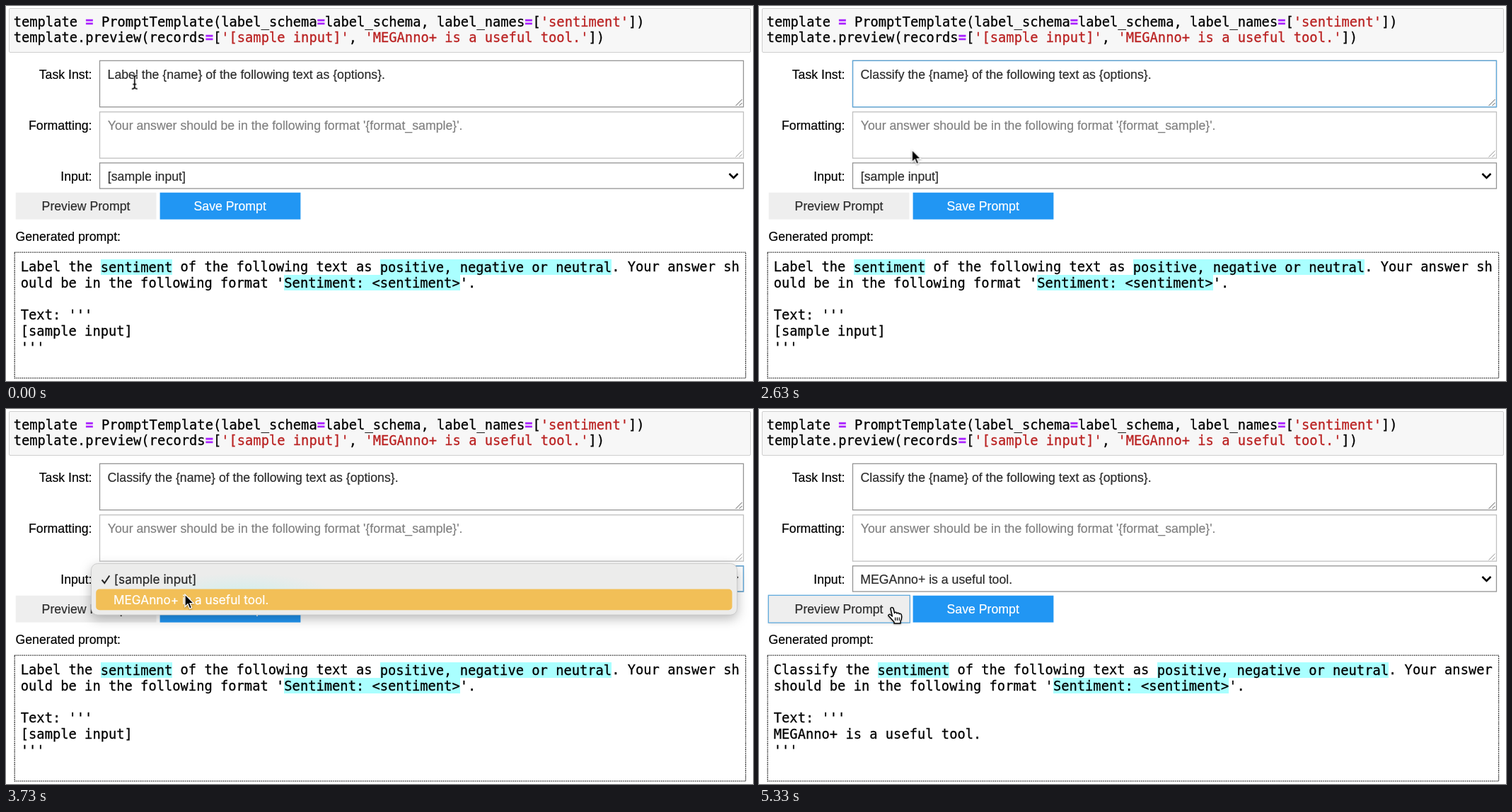
An HTML page that plays this animation: 1056 by 530 pixels, repeating every 5.6 s.

```html
<!DOCTYPE html>
<html lang="en">
<head>
<meta charset="utf-8">
<title>Prompt preview</title>
<style>
html, body { margin: 0; width: 100%; height: 100%; overflow: hidden; background: #fff; }
body { position: relative; }
pre {
  position: absolute; margin: 0; box-sizing: border-box; color: #000;
  font: 18.76px/22.77px "DejaVu Sans Mono", monospace;
  -webkit-text-stroke: .3px;
}
#cell {
  left: 4px; top: 3px; width: 1049px; height: 63px; padding: 7.6px 0 0 5.7px;
  background: #f7f7f7; border: 1px solid #cfcfcf; border-radius: 2px;
}
#cell b { color: #a2f; }
#cell i { color: #ba2121; font-style: normal; }
.out { left: 20.8px; top: 358px; }
.out span { background: #aff; padding: .5px 0; }
svg { position: absolute; left: 0; top: 0; }
text {
  font: 17.7px "Liberation Sans", Arial, sans-serif; white-space: pre;
  color: #2c2c2c; fill: currentColor; stroke: currentColor; stroke-width: .2;
}
.label { color: #000; text-anchor: end; }
.mid { text-anchor: middle; }
.menu text { font: 17.2px Inter, sans-serif; color: #262626; }
.menu .on text { color: #fff; }
.field { fill: #fff; stroke: #949494; stroke-width: 1.3; }
.ring { fill: none; stroke: #5fa9dd; stroke-width: 1.3; }
.grip { stroke: #555; stroke-width: 1; fill: none; }
.shade { filter: drop-shadow(0 2px 2px rgba(0,0,0,.35)); }
.on rect { fill: #f2bf57; }

/* Everything below runs on one 5.6 s loop */
.a { opacity: 0; animation: 5.6s step-end infinite; }
.k-task { animation-name: task; }
.k-caret { animation-name: caret; }
.k-sel { animation-name: sel, drag; animation-timing-function: step-end, linear; }
.k-select { animation-name: select; }
.k-before { animation-name: before; }
.k-after { animation-name: after; }
.k-menu { animation-name: menu; animation-timing-function: linear; }
.k-one { animation-name: one; }
.k-two { animation-name: two; }
.k-save { animation-name: save; }
.k-hover { animation-name: hover; }
.k-press { animation-name: press; }
.k-focus { animation-name: focus; }
.k-old { animation-name: old; }
.k-new { animation-name: fresh; }
.k-beam { animation-name: beam; }
.k-arrow { animation-name: arrow; }
.k-hand { animation-name: hand; }
#mouse { animation: move 5.6s linear infinite; }

@keyframes task { 0% { opacity: 0 } 9.64% { opacity: 1 } 51.79%, 100% { opacity: 0 } }
@keyframes caret { 0% { opacity: 0 } 9.64% { opacity: 1 } 10.71% { opacity: 0 } 17.86% { opacity: 1 } 45.9%, 100% { opacity: 0 } }
@keyframes sel { 0% { opacity: 0 } 10.71% { opacity: 1 } 17.86%, 100% { opacity: 0 } }
@keyframes drag {
  0%, 10.71% { x: 186.9px; width: 0 }
  14.82%, 100% { x: 143.6px; width: 43.3px }
}
@keyframes select { 0% { opacity: 0 } 51.79% { opacity: 1 } 84.64%, 100% { opacity: 0 } }
@keyframes before { 0% { opacity: 1 } 71.43%, 100% { opacity: 0 } }
@keyframes after { 0% { opacity: 0 } 71.43%, 100% { opacity: 1 } }
@keyframes menu { 0%, 52.31% { opacity: 0 } 52.32%, 71.43% { opacity: 1 } 74.1%, 100% { opacity: 0 } }
@keyframes one { 0% { opacity: 0 } 61.25% { opacity: 1 } 64.2%, 100% { opacity: 0 } }
@keyframes two { 0% { opacity: 0 } 64.2% { opacity: 1 } 69.64% { opacity: 0 } 70.71%, 100% { opacity: 1 } }
@keyframes save { 0% { opacity: 0 } 75% { opacity: 1 } 77.86%, 100% { opacity: 0 } }
@keyframes hover { 0% { opacity: 0 } 78.04% { opacity: 1 } 84.64%, 100% { opacity: .35 } }
@keyframes press { 0% { opacity: 0 } 84.64% { opacity: 1 } 86.6%, 100% { opacity: 0 } }
@keyframes focus { 0% { opacity: 0 } 84.64%, 100% { opacity: 1 } }
@keyframes old { 0% { opacity: 1 } 87.5%, 100% { opacity: 0 } }
@keyframes fresh { 0% { opacity: 0 } 87.5%, 100% { opacity: 1 } }
@keyframes beam { 0% { opacity: 1 } 17.86% { opacity: 0 } 41.61% { opacity: 1 } 44.5%, 100% { opacity: 0 } }
@keyframes arrow { 0% { opacity: 0 } 44.5% { opacity: 1 } 75%, 100% { opacity: 0 } }
@keyframes hand { 0% { opacity: 0 } 75%, 100% { opacity: 1 } }
@keyframes move {
  0%, .54% { transform: translate(181.8px, 107.6px); animation-timing-function: ease-in-out }
  9.64%, 10.71% { transform: translate(187px, 99px) }
  14.82%, 41.61% { transform: translate(145px, 99px); animation-timing-function: ease-in }
  46.96% { transform: translate(216px, 203px); animation-timing-function: ease-out }
  51.25%, 60.71% { transform: translate(248px, 234px); animation-timing-function: ease-in-out }
  66.61%, 72.3% { transform: translate(253px, 262px); animation-timing-function: ease-in }
  77.32% { transform: translate(220.5px, 272.5px); animation-timing-function: ease-out }
  79.1%, 79.8% { transform: translate(190px, 280px) }
  79.82%, 83.93% { transform: translate(189px, 280px) }
  85%, 95.17% { transform: translate(188.5px, 280.5px) }
  95.18%, 100% { transform: translate(188px, 281px) }
}
</style>
</head>
<body>
<pre id="cell">template <b>=</b> PromptTemplate(label_schema<b>=</b>label_schema, label_names<b>=</b>[<i>'sentiment'</i>])
template.preview(records<b>=</b>[<i>'[sample input]'</i>, <i>'MEGAnno+ is a useful tool.'</i>])</pre>

<pre class="out a k-old">Label the <span>sentiment</span> of the following text as <span>positive, negative or neutral</span>. Your answer sh
ould be in the following format '<span>Sentiment: &lt;sentiment&gt;</span>'.

Text: '''
[sample input]
'''</pre>

<pre class="out a k-new">Classify the <span>sentiment</span> of the following text as <span>positive, negative or neutral</span>. Your answer
should be in the following format '<span>Sentiment: &lt;sentiment&gt;</span>'.

Text: '''
MEGAnno+ is a useful tool.
'''</pre>

<svg width="1056" height="530" viewBox="0 0 1056 530">
  <defs>
    <path id="grip" d="M0 9L9 0M5 9L9 5"/>
    <radialGradient id="tint">
      <stop offset="0" stop-color="#d3eeec"/>
      <stop offset="1" stop-color="#d3eeec" stop-opacity="0"/>
    </radialGradient>
    <path id="beam" d="M-4-9.5Q0-9.5 0-6.5Q0-9.5 4-9.5M0-6.5V6.5M-4 9.5Q0 9.5 0 6.5Q0 9.5 4 9.5M-2.5 3H2.5" fill="none"/>
  </defs>

  <!-- task instruction -->
  <text class="label" x="121.5" y="102.7">Task Inst:</text>
  <rect class="field" x="132.5" y="77.3" width="910" height="65.4"/>
  <rect class="ring a k-task" x="132.5" y="77.3" width="910" height="65.4"/>
  <use href="#grip" class="grip" x="1031.5" y="132"/>
  <rect class="a k-sel" x="143.6" y="86" width="0" height="21" fill="#b3d7ff"/>
  <text x="143.6" y="102.7"><tspan id="word">Label</tspan><tspan> the {name} of the following text as {options}.</tspan></text>
  <rect id="caret" class="a k-caret" x="186" y="86" width="1.4" height="21" fill="#000"/>

  <!-- formatting -->
  <text class="label" x="121.5" y="175">Formatting:</text>
  <rect class="field" x="132.5" y="149.7" width="910" height="65.4" style="stroke:#c0c0c0"/>
  <use href="#grip" class="grip" x="1031.5" y="204.5" style="stroke:#999"/>
  <text x="143.8" y="175" style="color:#808080">Your answer should be in the following format '{format_sample}'.</text>

  <!-- input -->
  <text class="label" x="121.5" y="247.3">Input:</text>
  <rect class="field" x="132.5" y="221.8" width="910" height="36.2"/>
  <rect class="ring a k-select" x="132.5" y="221.8" width="910" height="36.2"/>
  <text class="a k-before" x="143.8" y="247.3">[sample input]</text>
  <text class="a k-after" x="143.3" y="247.3">MEGAnno+ is a useful tool.</text>
  <path d="M1022.5 237L1028.5 243L1034.5 237" fill="none" stroke="#000" stroke-width="2.5"/>

  <!-- buttons -->
  <rect class="shade a k-hover" x="13.7" y="263.7" width="198.8" height="37.9" fill="#eee"/>
  <rect x="13.7" y="263.7" width="198.8" height="37.9" fill="#eee"/>
  <rect class="a k-press" x="13.7" y="263.7" width="198.8" height="37.9" fill="#bdbdbd"/>
  <rect class="ring a k-focus" x="13.3" y="263.3" width="200" height="38.8"/>
  <text class="mid" x="113" y="289">Preview Prompt</text>
  <rect class="shade a k-save" x="217.6" y="263.7" width="198.8" height="37.9" fill="#2196f3"/>
  <rect x="217.6" y="263.7" width="198.8" height="37.9" fill="#2196f3"/>
  <text class="mid" x="316.7" y="289" style="color:#fff">Save Prompt</text>

  <!-- output -->
  <text x="13.5" y="332" style="color:#000">Generated prompt:</text>
  <rect x="12.2" y="348.2" width="1033.4" height="177.6" fill="none" stroke="#000" stroke-width="1.34" stroke-dasharray="1.34"/>

  <!-- drop-down menu -->
  <g class="menu a k-menu">
    <rect x="120.5" y="218.5" width="913" height="72.5" rx="9" fill="#ececeb" stroke="#c4c4c4" stroke-width=".8" style="filter:drop-shadow(0 5px 8px rgba(0,0,0,.28))"/>
    <ellipse cx="335" cy="261" rx="130" ry="29" fill="url(#tint)"/>
    <path d="M135.5 241.5L139.3 246L146.3 235.5" fill="none" stroke="#262626" stroke-width="2"/>
    <text x="152.8" y="246.7">[sample input]</text>
    <text x="152" y="276.2">MEGAnno+ is a useful tool.</text>
    <g class="on a k-one">
      <rect x="127.2" y="225.3" width="899.3" height="29.3" rx="5"/>
      <path d="M135.5 241.5L139.3 246L146.3 235.5" fill="none" stroke="#fff" stroke-width="2"/>
      <text x="152.8" y="246.7">[sample input]</text>
    </g>
    <g class="on a k-two">
      <rect x="127.2" y="254.6" width="899.3" height="29.6" rx="5"/>
      <text x="152" y="276.2">MEGAnno+ is a useful tool.</text>
    </g>
  </g>

  <!-- pointer -->
  <g id="mouse">
    <g class="a k-beam">
      <use href="#beam" stroke="#fff" stroke-width="3.4"/>
      <use href="#beam" stroke="#000" stroke-width="1.6"/>
    </g>
    <g class="a k-arrow" style="filter:drop-shadow(0 1px 1px rgba(0,0,0,.35))">
      <path d="M0 0V17.5L4 13.6L6.6 20L9.6 18.8L7 12.6H12.4Z" fill="#000" stroke="#fff" stroke-width="1.3"/>
    </g>
    <g class="a k-hand" stroke="#000" stroke-width="1.5" stroke-linejoin="round" style="filter:drop-shadow(0 1px 1px rgba(0,0,0,.3))">
      <path d="M-2 1.2C-2-.8 1.4-1 2 1L3.6 7.5C4 5.8 6.6 6 7 8C7.6 6.6 10 7 10.3 8.8C11 7.8 13.2 8.2 13.4 10.4C14 13.5 13.2 17 12 19V22H3V20C0 17-2.5 14-4.8 11.5C-5.8 9.8-3.6 8.6-2 10L.4 12Z" fill="#fff"/>
      <path d="M4.6 13.5V18M7.4 13.5V18M10.2 13.5V18" fill="none" stroke-width="1.2"/>
    </g>
  </g>
</svg>

<script>
const LOOP = 5600;
const word = document.getElementById('word');
const caret = document.getElementById('caret');
const FULL = 'Classify';
// moment at which each letter of the new word appears
const KEYS = [1200, 1370, 1500, 1640, 1770, 1870, 1970, 2070];
let start, shown;

function typed(t) {
  if (t < 1000) return 'Label';
  return FULL.slice(0, KEYS.filter(k => k <= t).length);
}

function tick(now) {
  start ??= now;
  const s = typed((now - start) % LOOP);
  if (s !== shown) {
    word.textContent = shown = s;
    const w = s ? word.getComputedTextLength() : 0;
    caret.setAttribute('x', 143.2 + w);
  }
  requestAnimationFrame(tick);
}
requestAnimationFrame(tick);
</script>
</body>
</html>
```
